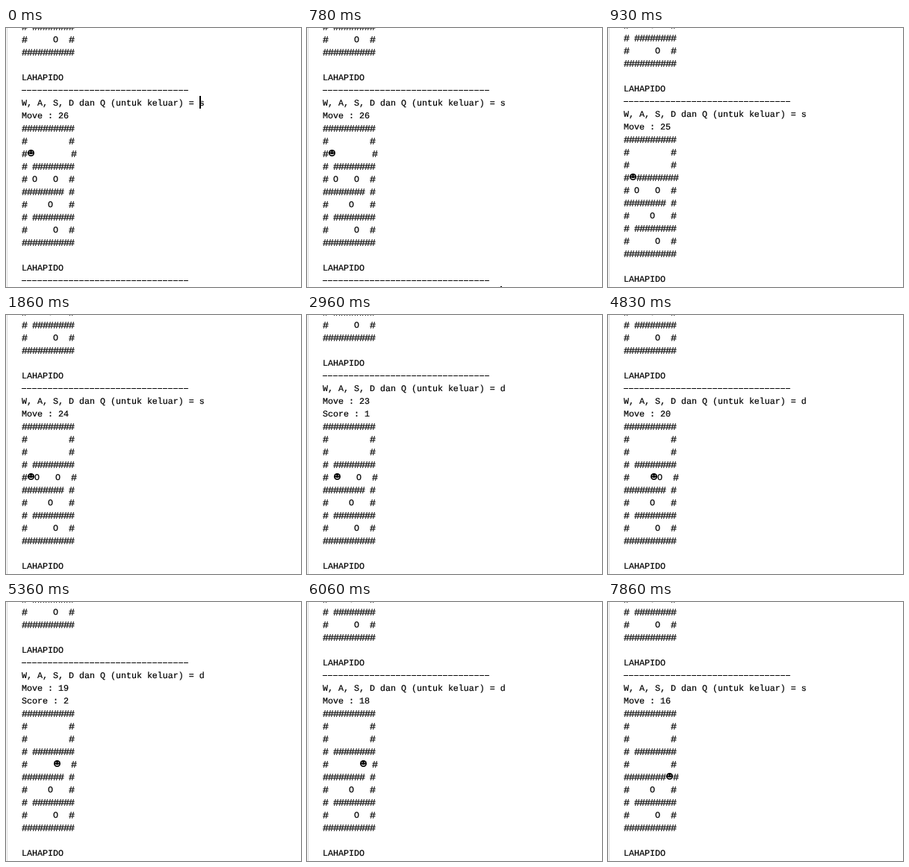
An HTML page that plays this animation: 395x347 px, repeating every 8000 ms.

```html
<!DOCTYPE html>
<html lang="id">
<head>
<meta charset="utf-8">
<style>
  html, body { margin: 0; width: 395px; height: 347px; overflow: hidden; background: #fff; }
  svg { display: block; }
  text {
    font: 11.667px "Liberation Mono", "Courier New", monospace;
    white-space: pre;
    text-rendering: geometricPrecision;
    stroke: #000;
    stroke-width: .2px;
  }
  .wall { font-size: 13.333px; letter-spacing: -1px; baseline-shift: -1px; }
</style>
</head>
<body>
<svg id="stage" width="395" height="347" viewBox="0 0 395 347">
  <rect width="395" height="347" fill="#fff"/>
  <rect x="1" width="1" height="347" fill="#d8d8d8"/>
  <g id="console"></g>
  <rect id="caret" width="2" height="17"/>
</svg>
<script>
const LOOP = 8000, LEFT = 21, CELL = 7, LINE = 17, FACE = 10;
const TITLE = 'LAHAPIDO';
const RULE = '-'.repeat(32);
const MAZE = [
  '##########',
  '#        #',
  '#        #',
  '# ########',
  '# O   O  #',
  '######## #',
  '#    O   #',
  '# ########',
  '#     O  #',
  '##########'
];

// Each turn: start time, key, moves left, player row and column, pellets eaten
const TURNS = [
  { at: 0, key: 's', move: 26, row: 2, col: 1, eaten: 0, top: 134 },
  { at: 930, key: 's', move: 25, row: 3, col: 1, eaten: 0 },
  { at: 1860, key: 's', move: 24, row: 4, col: 1, eaten: 0 },
  { at: 2960, key: 'd', move: 23, row: 4, col: 2, eaten: 1, scored: true },
  { at: 3730, key: 'd', move: 22, row: 4, col: 3, eaten: 1 },
  { at: 4280, key: 'd', move: 21, row: 4, col: 4, eaten: 1 },
  { at: 4830, key: 'd', move: 20, row: 4, col: 5, eaten: 1 },
  { at: 5360, key: 'd', move: 19, row: 4, col: 6, eaten: 2, scored: true },
  { at: 6060, key: 'd', move: 18, row: 4, col: 7, eaten: 2 },
  { at: 7080, key: 'd', move: 17, row: 4, col: 8, eaten: 2 },
  { at: 7860, key: 's', move: 16, row: 5, col: 8, eaten: 2 }
];

const CARET = [
  { at: 0, x: 259, y: 91 },
  { at: 230, x: 21, y: 346 },
  { at: 400, x: 266, y: 346 },
  { at: 780, x: 259, y: 346 },
  { at: 930, x: 21, y: 361 }
];

const output = document.getElementById('console');
const caret = document.getElementById('caret');
const current = (list, t) => list.filter(item => item.at <= t).pop();

// y is the middle of the line
function text(s, y, x = LEFT) {
  if (!s.trim()) return '';
  const content = s.replace(/#+/g, '<tspan class="wall">$&</tspan>');
  return `<text x="${x}" y="${y + 4}">${content}</text>`;
}

const rule = y =>
  `<path d="M${LEFT} ${y + .5}h${RULE.length * CELL}" stroke="#000" stroke-dasharray="6 1"/>`;

const face = (x, y) => `<g transform="translate(${x} ${y})">
  <circle r="4.5"/>
  <path d="M-2.5-1.5h1.6M.9-1.5h1.6M-2.5 1.2Q0 3.6 2.5 1.2" fill="none" stroke="#fff" stroke-width="1.1"/>
</g>`;

function playerLine(s, col, y) {
  const x = LEFT + col * CELL;
  return text(s.slice(0, col), y) + face(x + 5.5, y - .5) + text(s.slice(col + 1), y, x + FACE);
}

function drawTurn(turn) {
  const top = turn.top ?? 149;
  const maze = [...MAZE];
  for (let i = 0; i < turn.eaten; i++) maze[4] = maze[4].replace('O', ' ');

  const head = [
    ...MAZE.slice(5), '', TITLE, RULE,
    `W, A, S, D dan Q (untuk keluar) = ${turn.key}`,
    `Move : ${turn.move}`
  ];
  if (turn.scored) head.push(`Score : ${turn.eaten}`);

  const lines = [...head, ...maze, '', TITLE, RULE];
  const playerIndex = head.length + turn.row;
  output.innerHTML = lines.map((s, i) => {
    const y = top + (i - head.length) * LINE;
    if (s === RULE) return rule(y);
    return i === playerIndex ? playerLine(s, turn.col, y) : text(s, y);
  }).join('');
}

let shown;
function render(now) {
  const t = now % LOOP;
  const turn = current(TURNS, t);
  if (turn !== shown) drawTurn(shown = turn);
  const { x, y } = current(CARET, t);
  caret.setAttribute('x', x);
  caret.setAttribute('y', y);
}

const start = performance.now();
function tick() {
  render(performance.now() - start);
  requestAnimationFrame(tick);
}
tick();
</script>
</body>
</html>
```
